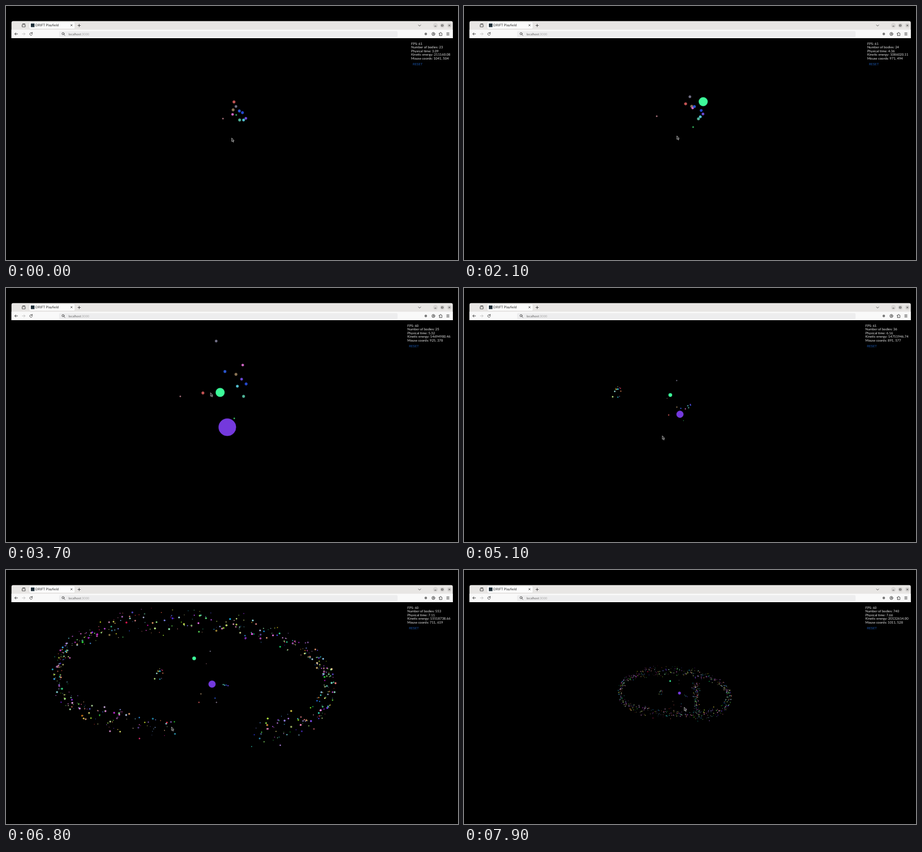
An HTML page for the animation above (8 s loop, 800 by 450 pixels).

```html
<!DOCTYPE html>
<html lang="en">
<head>
<meta charset="utf-8">
<title>Gravity sandbox</title>
<style>
  html, body { margin: 0; width: 100%; height: 100%; overflow: hidden; background: #000; }
  svg { display: block; width: 100%; height: 100%; }
  text { font-family: Lato, "Open Sans", sans-serif; text-rendering: geometricPrecision; white-space: pre; }
  .line { fill: none; stroke: #333; stroke-width: .8; stroke-linecap: round; stroke-linejoin: round; }
  #world circle { fill: currentColor; stroke: currentColor; stroke-width: .4; vector-effect: non-scaling-stroke; }
</style>
</head>
<body>
<svg id="stage" viewBox="0 0 800 450">
  <rect width="800" height="450"/>
  <g id="world"></g>

  <g id="browser">
    <path d="M9.700 57V29.700q0-3 3-3H787.800q3 0 3 3V57z" fill="#e8e6e4"/>
    <rect x="9.700" y="42" width="781.100" height="15" fill="#f9f9f9"/>
    <rect x="41" y="28.300" width="81" height="12.400" rx="2" fill="#fbfbfb" stroke="#d2d0ce" stroke-width=".5"/>
    <rect x="44" y="31" width="6.400" height="6.400" fill="#20303a"/>
    <text x="52" y="36.300" font-size="6.100" fill="#333">DRIFT Playfield</text>
    <rect x="94" y="44.400" width="599" height="10.800" rx="2" fill="#ededee"/>
    <text x="110.500" y="51.500" font-size="5.650" fill="#666">localhost<tspan fill="#aaa">:3000</tspan></text>
    <g fill="#d8d6d4">
      <circle cx="760" cy="34.500" r="4.200"/><circle cx="772.300" cy="34.500" r="4.200"/><circle cx="784.700" cy="34.500" r="4.200"/>
    </g>
    <g class="line">
      <path d="M29 33h5v4h-5zM29.500 31.500h4M114.600 32.800l2.600 2.600m0-2.600l-2.600 2.600M127.200 34.500h4.600m-2.300-2.300v4.600M730 33.600l2 2 2-2"/>
      <path d="M758.800 35.800h2.400M771 33.200h2.600v2.600h-2.600zM783.500 33.300l2.400 2.400m0-2.400l-2.400 2.400"/>
      <path d="M20.500 49.500h-5m2.200-2.200l-2.200 2.200 2.200 2.200M46 48a2.300 2.300 0 1 0 .6 2M46.500 46.700v1.700h-1.700"/>
      <path d="M28.800 49.500h5m-2.200-2.200l2.200 2.200-2.200 2.200" stroke="#bbb"/>
      <circle cx="101" cy="49" r="1.900"/><path d="M102.500 50.500l1.700 1.700"/>
      <circle cx="756.400" cy="49.500" r="2.700"/><path d="M754.800 51.300q1.600-1.500 3.200 0"/>
      <path d="M767 48.200h1.300q0-1.500 1-1.500t1 1.500h1.300v4.200H767v-1.300q1.200 0 1.200-.8t-1.200-.8zM780 47.500h4.200M780 49.500h4.200M780 51.500h4.200"/>
    </g>
    <circle cx="756.400" cy="48.800" r="1" fill="#333"/>
    <circle cx="743" cy="49.500" r="2.200" fill="#777"/>
  </g>

  <g id="panel" font-size="5.930" fill="#e4e4e4"></g>
  <path id="cursor" d="M0 0V6.300L1.400 5.100 2.500 7.500 3.500 7 2.500 4.700H4.200z" fill="#222" stroke="#ddd" stroke-width=".65"/>
</svg>
<script>
const SVG = "http://www.w3.org/2000/svg";
const LOOP = 8000, STEP = 100;
const CX = 400, CY = 238, ZOOM = 0.4;
const GREEN_BORN = 1.5, PURPLE_BORN = 3.3, CLUSTER_BORN = 4.8;
const MIDDLE = 3.7, LATE = 6.8;
const CLUSTER_SIZE = 11, SPRAY_SIZE = 704, SPRAY_RATE = 341;
const SPRAY_START = 5.283, RING_END = 6.96;

const $ = id => document.getElementById(id);
const world = $("world"), panel = $("panel"), cursor = $("cursor");

function add(parent, tag, attrs) {
  const el = document.createElementNS(SVG, tag);
  for (const name in attrs) el.setAttribute(name, attrs[name]);
  return parent.appendChild(el);
}

function place(el, [cx, cy], visible) {
  el.setAttribute("cx", cx);
  el.setAttribute("cy", cy);
  show(el, visible);
}

function show(el, visible) {
  el.setAttribute("visibility", visible ? "visible" : "hidden");
}

function random(seed) {
  return () => {
    seed = (seed * 1664525 + 1013904223) % 4294967296;
    return seed / 4294967296;
  };
}

const progress = (from, to, t) => Math.min(1, Math.max(0, (t - from) / (to - from)));
const mix = (a, b, u) => a.map((v, k) => v + (b[k] - v) * u);

// Smooth curve through [time, ...values] keys.
function path(keys, t) {
  let i = 0;
  while (i < keys.length - 2 && t >= keys[i + 1][0]) i++;
  const p = keys[i], q = keys[i + 1], before = keys[i - 1] || p, after = keys[i + 2] || q;
  const h = q[0] - p[0], u = progress(p[0], q[0], t), v = 1 - u;
  const slope = (a, b, k) => (b[k] - a[k]) / (b[0] - a[0]);
  return p.slice(1).map((value, j) => {
    const k = j + 1;
    const bend = slope(before, q, k) * v - slope(p, after, k) * u;
    return value + (q[k] - value) * u * u * (3 - 2 * u) + h * u * v * bend;
  });
}

const zoom = t => ZOOM ** (progress(3.9, 4.5, t) + progress(7.3, 7.8, t));
const unzoom = ([x, y]) => [CX + (x - CX) / ZOOM, CY + (y - CY) / ZOOM];

// The pointer circles a tilted oval with a squarer lower half.
const ringAngle = t => (64 - 214 * (t - SPRAY_START)) * Math.PI / 180;
function ring(t) {
  const c = Math.cos(ringAngle(t)), s = Math.sin(ringAngle(t));
  const bulge = s > 0 ? 1 + c * c / 2 : 1;
  return [332 + 240 * c, 185 + 95 * s * bulge + 12 * c];
}

const approach = [
  [0, 399.5, 233.8], [0.9, 430, 185], [1.5, 440, 163], [2.1, 376.8, 230], [2.95, 412, 374],
  [MIDDLE, 362, 185.5], [CLUSTER_BORN, 273, 187], [5.1, 351, 261.8], [SPRAY_START, ...ring(SPRAY_START)]
];
const departure = [[RING_END, ...ring(RING_END)], [7.35, 424, 150], [7.9, 389.8, 243]];

function pointer(t) {
  if (t < SPRAY_START) return path(approach, t);
  return t < RING_END ? ring(t) : path(departure, t);
}

// Each body drifts slowly, is flung past `middle` by the heavy ones, then coasts to `late`.
const bodies = [];
function body(color, r, start, middle, late, { born = 0, power = 2.8 } = {}) {
  const el = add(world, "circle", { color, r });
  const target = unzoom(late);
  const position = t => t < MIDDLE
    ? mix(start, middle, (t / MIDDLE) ** power)
    : mix(middle, target, (t - MIDDLE) / (LATE - MIDDLE));
  bodies.push({ el, born, position });
}

body("#c45454", 2.4, [403.5, 170], [348.5, 186], [341.5, 234.5]);
body("#716f86", 2.2, [407, 178], [372, 94], [361.5, 144]);
body("#8a7355", 2.4, [402, 184], [407, 153], [345, 219.5]);
body("#d468c8", 2.1, [401, 192], [419, 136.5], [372.5, 234.5]);
body("#2b57d0", 2.4, [413, 186], [387.5, 148], [370, 227]);
body("#2448cc", 2.4, [418.5, 189], [425, 170], [390, 204]);
body("#6a4ad8", 2.2, [424.5, 199], [417, 161.5], [393, 205]);
body("#50b498", 2.4, [413.5, 202], [420.5, 192], [384.5, 203]);
body("#52bfd0", 2.3, [420.5, 202], [409.5, 174], [387, 204]);
body("#a8707c", 1.2, [384, 199.5], [308.5, 192], [354.5, 166], { power: 1 });
body("#38b860", 1.2, [407.5, 193], [404, 231], [372.5, 234.5], { power: 1 });
body("#3dfa9a", 7.8, [437.6, 164.6], [379, 185], [333, 156.5], { born: GREEN_BORN, power: 2.5 });
body("#7439dd", 15.4, [435, 301], [391.7, 246.7], [364.7, 202.2], { born: PURPLE_BORN, power: 2.5 });

// Small random bodies: one burst, then a spray that swells and narrows along the ring.
const rand = random(77);
function dot([x, y], spread) {
  const angle = rand() * 2 * Math.PI, reach = spread * (rand() + rand());
  const [cx, cy] = unzoom([x + reach * Math.cos(angle), y + reach * Math.sin(angle)]);
  const color = `hsl(${rand() * 360} ${30 + 55 * rand()}% ${38 + 38 * rand()}%)`;
  return add(world, "circle", { cx, cy, color, r: 0.8 + 3.2 * rand() ** 1.4 });
}

const dots = [];
for (let i = 0; i < CLUSTER_SIZE; i++) dots.push(dot([273, 187], 8));
for (let i = 0; i < SPRAY_SIZE; i++) {
  const t = SPRAY_START + i / SPRAY_RATE;
  dots.push(dot(pointer(t), 12 + 4 * Math.cos(2.25 * (ringAngle(t) - 1.2))));
}

const lines = [0, 1, 2, 3, 4].map(i => add(panel, "text", { y: 68.6 + i * 6.6 }));
add(panel, "text", {
  x: 3, y: 104.7, fill: "#1b56ad", "font-size": 5.7, "letter-spacing": 0.16,
  style: "font-family: Roboto, sans-serif"
}).textContent = "RESET";

function dotCount(t) {
  if (t < CLUSTER_BORN) return 0;
  const sprayed = Math.floor(SPRAY_RATE * (t - SPRAY_START));
  return CLUSTER_SIZE + Math.min(SPRAY_SIZE, Math.max(0, sprayed));
}

function physicalTime(t) {
  const lag = Math.max(0, t - 5.8);
  return 3.09 + 0.6025 * t - 0.07 * lag - 0.0095 * lag * lag;
}

const lateEnergy = [
  [MIDDLE, 14694980.46], [5.1, 14751946.74], [5.8, 14665154.93], [LATE, 15518738.66], [7.9, 20132614]
];
function kineticEnergy(t) {
  if (t < GREEN_BORN) return 211160.08 + 2601.37 * t;
  if (t < PURPLE_BORN) return 1086020.11 + 11183.29 * (t - 2.1);
  return path(lateEnergy, t)[0];
}

function mouseCoords(t) {
  const [x, y] = pointer(t);
  return [1041 + 3.1 * (x - 399.5), 504 + 2.6 * (y - 233.8)].map(Math.round).join(", ");
}

function render(t) {
  const count = dotCount(t);
  const heavy = (t >= GREEN_BORN) + (t >= PURPLE_BORN);
  const fast = t < 3.1 || (t >= CLUSTER_BORN && t < 5.6);
  const energy = kineticEnergy(t).toFixed(2);

  world.setAttribute("transform", `translate(${CX} ${CY}) scale(${zoom(t)}) translate(${-CX} ${-CY})`);
  bodies.forEach(({ el, born, position }) => place(el, position(t), t >= born));
  dots.forEach((el, i) => show(el, i < count));

  [
    `FPS: ${fast ? 61 : 60}`,
    `Number of bodies: ${23 + heavy + count}`,
    `Physical time: ${physicalTime(t).toFixed(2)}`,
    `Kinetic energy: ${energy}`,
    `Mouse coords: ${mouseCoords(t)}`
  ].forEach((label, i) => { lines[i].textContent = label; });
  panel.setAttribute("transform", `translate(${717 - 3.35 * (energy.length - 9)} 0)`);

  cursor.setAttribute("transform", `translate(${pointer(t).join(" ")})`);
}

const start = performance.now();
function tick() {
  const elapsed = (performance.now() - start) % LOOP;
  render(Math.floor(elapsed / STEP) * STEP / 1000);
  requestAnimationFrame(tick);
}
tick();
</script>
</body>
</html>
```
